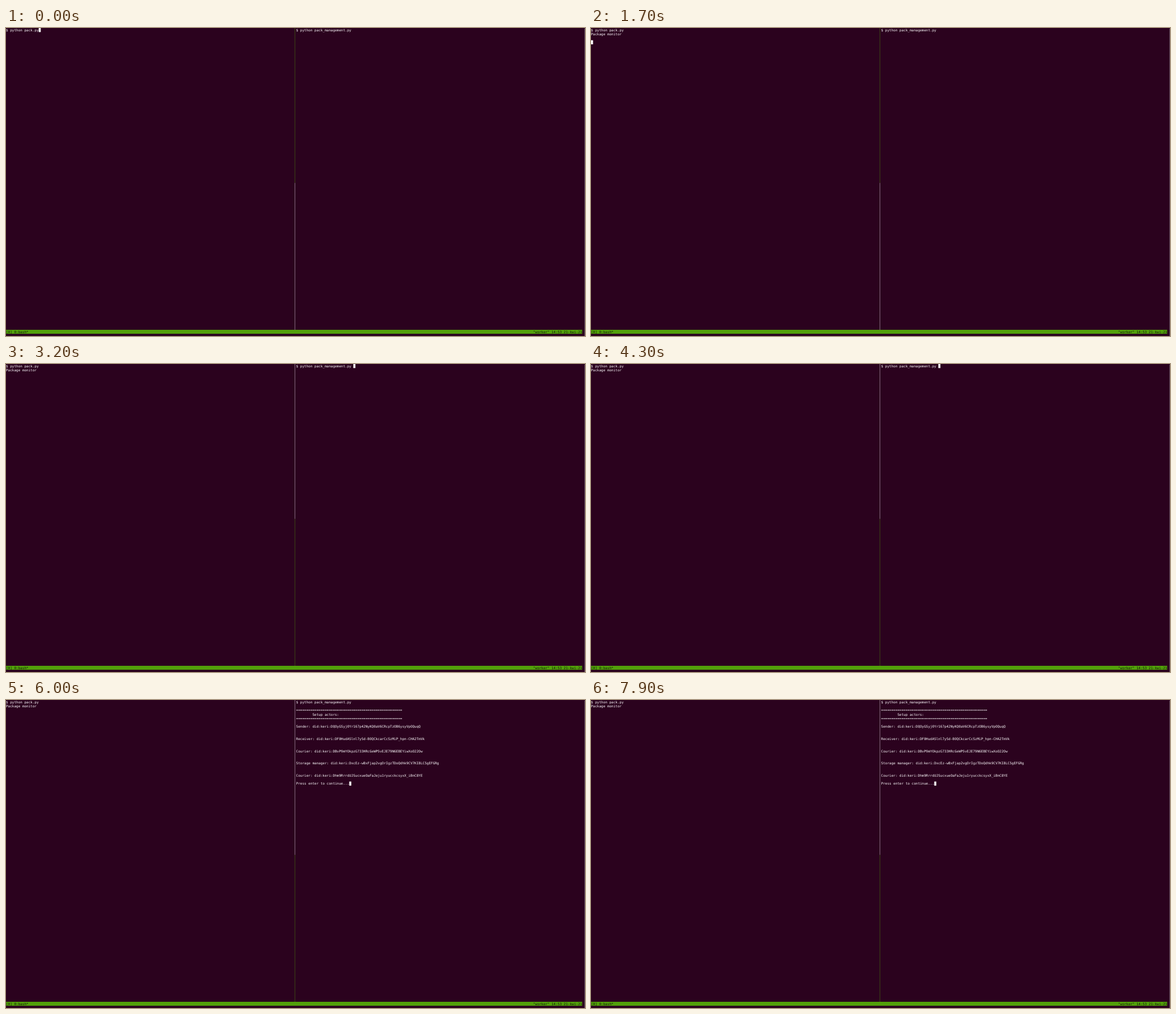
These frames come from a looping animation (1025 by 546 pixels, 8 s). An HTML page:

```html
<!DOCTYPE html>
<html lang="en">
<head>
<meta charset="utf-8">
<title>Package terminal</title>
<style>
  html, body { margin: 0; width: 100%; height: 100%; overflow: hidden; background: #2b021e; }
  svg { display: block; width: 1025px; height: 546px; }
  text {
    font: 6.008px "DejaVu Sans Mono", monospace;
    white-space: pre;
    text-rendering: geometricPrecision;
    font-variant-ligatures: none;
  }
</style>
</head>
<body>
<svg id="stage" viewBox="0 0 1025 546" xmlns="http://www.w3.org/2000/svg"></svg>
<script>
const LOOP = 8000, CELL_W = 3.617, CELL_H = 7.227, BASE = 5.85;
const PANE = 142, SPLIT = 38, STATUS = 74;
const GREEN = '#52a00a', WHITE = '#ffffff', BACK = '#2b021e';
const stage = document.getElementById('stage');

function add(tag, attrs) {
  const el = document.createElementNS('http://www.w3.org/2000/svg', tag);
  for (const key in attrs) el.setAttribute(key, attrs[key]);
  return stage.appendChild(el);
}

const rect = (x, y, width, height, fill) => add('rect', { x, y, width, height, fill });

function print(col, row, str, fill = WHITE) {
  const el = add('text', { x: col * CELL_W, y: row * CELL_H + BASE, fill });
  el.textContent = str;
  return el;
}

rect(0, 0, 1025, 546, BACK);
rect(1024, 1, 1, 545, '#6b5566');

const splitY = SPLIT * CELL_H, barY = Math.round(STATUS * CELL_H);
const upper = rect(511, 0, 1, splitY, GREEN);
const lower = rect(511, splitY, 1, barY - splitY, WHITE);
upper.setAttribute('opacity', 0.42);
lower.setAttribute('opacity', 0.42);

rect(0, barY, 282 * CELL_W, 7, GREEN);
const task = print(0, STATUS, '', '#10140a');
print(258, STATUS, '"worker" 14:53 21-kwi-21', '#10140a');

print(0, 0, '$ python pack.py');
print(PANE, 0, '$ python pack_management.py');
const monitor = print(0, 1, 'Package monitor');

const rule = '='.repeat(52);
const output = [
  [2, rule],
  [3, '        Setup actors:'],
  [4, rule],
  [6, 'Sender: did:keri:DQOyGSyj0Yr167p42NyKQ0aV6CRcpTzOB6ysyVpOQuqQ'],
  [9, 'Receiver: did:keri:DF0HudASlnl7ySd-BOQCkcarCcSzMiP_hpn-CHA2TmVk'],
  [12, 'Courier: did:keri:DBvP9mYOkpzG733HRcGeWP5vEJE79N6EBEYiwXoO22Ow'],
  [15, 'Storage manager: did:keri:DxcEz-wBxFjap2vgOrIgzTDoQdhk9CV7KI8LC5gEFGRg'],
  [18, 'Courier: did:keri:Dhm9RrrdUJSucxueOaFaJeju1ryucckcsyxX_iBnC8YE'],
  [20, 'Press enter to continue...']
].map(([row, str]) => print(PANE, row, str));

const cursor = rect(0, 0, CELL_W, CELL_H, WHITE);

// Cursor cell from a given time on, and the times at which it toggles.
const spots = [
  { from: 0, col: 16, row: 0, blinks: [600, 1200] },
  { from: 1700, col: 0, row: 3, blinks: [2300, 2700] },
  { from: 3200, col: PANE + 28, row: 0, blinks: [3700, 4300, 5000] },
  { from: 6000, col: PANE + 26, row: 20, blinks: [6100, 6700, 7300, 7900] }
];

const show = (el, on) => el.setAttribute('visibility', on ? 'visible' : 'hidden');

function draw(t) {
  const spot = spots.filter(s => t >= s.from).pop();
  cursor.setAttribute('x', spot.col * CELL_W);
  cursor.setAttribute('y', spot.row * CELL_H);
  show(cursor, spot.blinks.filter(b => t >= b).length % 2 === 0);

  show(monitor, t >= 1700);
  output.forEach(line => show(line, t >= 6000));
  task.textContent = t >= 2600 && t < 3200 ? '[0] 0:python*' : '[0] 0:bash*';

  const right = t >= 3200;
  upper.setAttribute('fill', right ? WHITE : GREEN);
  lower.setAttribute('fill', right ? GREEN : WHITE);
}

const start = performance.now();
function tick() {
  draw((performance.now() - start) % LOOP);
  requestAnimationFrame(tick);
}
draw(0);
requestAnimationFrame(tick);
</script>
</body>
</html>
```
